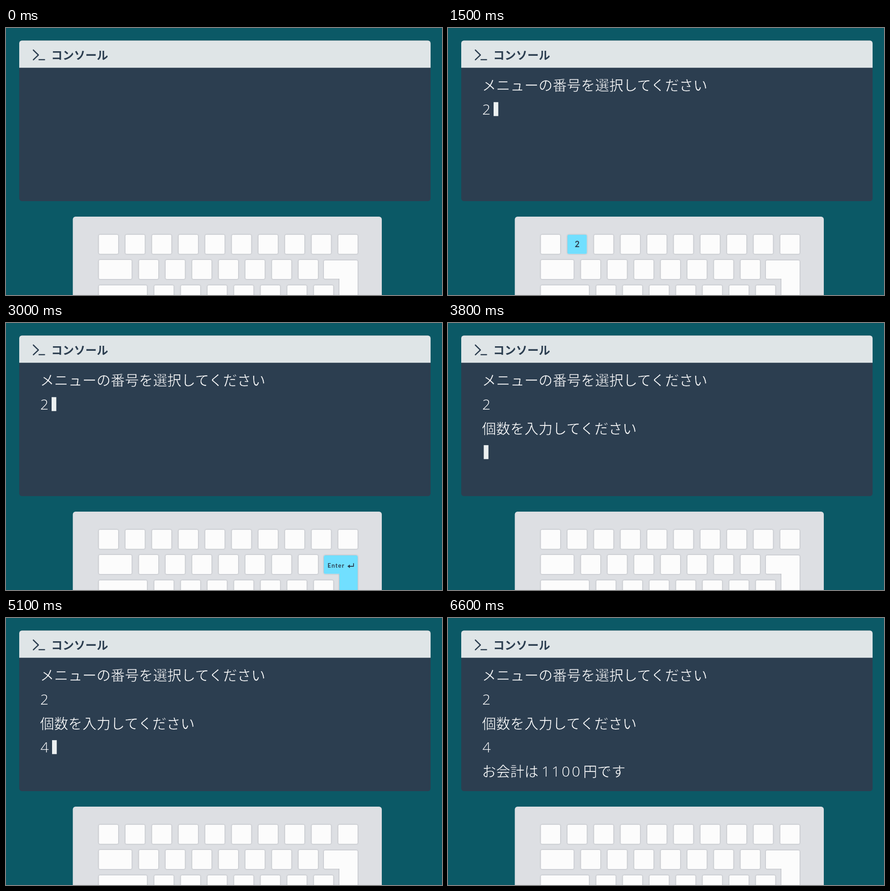
Write an HTML page that moves like this. It is 956 px wide and 586 px high and loops after 8600 ms.

```html
<!DOCTYPE html>
<html lang="ja">
<head>
<meta charset="utf-8">
<title>コンソール</title>
<style>
  html, body { margin: 0; width: 100%; height: 100%; overflow: hidden; background: #0b5966; }
  svg { display: block; width: 956px; height: 586px; }
  text { white-space: pre; }
  .title { font: 700 25px "Noto Sans CJK JP", sans-serif; fill: #2c3e50; }
  .jp { font: 300 31px "Noto Sans CJK JP", sans-serif; fill: #fff; }
  .num { font: 300 32px "Open Sans", sans-serif; fill: #fff; letter-spacing: 3.8px; }
  .thin { stroke: #2c3e50; stroke-width: .6px; }
  .cap { font: 700 13px Lato, sans-serif; fill: #2c3e50; letter-spacing: 1.3px; }
  .digit { font-size: 18px; letter-spacing: 0; text-anchor: middle; }
  .cursor { fill: #ecf0f1; }
  .key { fill: #fcfcfc; }
  .lit { fill: #71dfff; }
  .ink { fill: none; stroke: #2c3e50; stroke-linecap: round; stroke-linejoin: round; }
  #keys { filter: drop-shadow(0 0 1.5px rgba(50, 55, 65, .38)); }
</style>
</head>
<body>
<svg viewBox="0 0 956 586">
  <rect width="956" height="586" fill="#0b5966"/>
  <rect x="29" y="27.5" width="902" height="352.5" rx="6" fill="#2c3e50"/>
  <path d="M29 87.3V33.5a6 6 0 0 1 6-6H925a6 6 0 0 1 6 6V87.3Z" fill="#dfe5e7"/>
  <path class="ink" stroke-width="2.6" d="M60 48.5L71 59.3L60 69.7M72.5 69.5H84.5"/>
  <text class="title" x="99" y="69">コンソール</text>
  <rect x="146.5" y="414" width="677.5" height="190" rx="6" fill="#dddfe3"/>
  <g id="keys"></g>
  <g id="live"></g>
</svg>
<script>
const LOOP = 8600;
const keys = document.getElementById('keys');
const live = document.getElementById('live');

function add(parent, tag, attrs, text = '') {
  const el = document.createElementNS('http://www.w3.org/2000/svg', tag);
  for (const name in attrs) el.setAttribute(name, attrs[name]);
  el.textContent = text;
  parent.append(el);
  return el;
}

// Show an element between two times of the loop, with hard cuts.
function show(el, on, off = LOOP) {
  const step = (opacity, time) => ({ opacity, offset: time / LOOP, easing: 'step-end' });
  el.style.opacity = 0;
  el.animate([step(0, 0), step(1, on), step(0, off), step(0, LOOP)],
    { duration: LOOP, iterations: Infinity });
}

// Keyboard
const PITCH = 58.33;
const keyBox = (x, y, width = 42.4) => ({ x, y, width, height: 42, rx: 3 });
const keyX = i => 203.6 + i * PITCH;
const enterShape = 'M700 510H768a3 3 0 0 1 3 3V600H731V550.5H700a3 3 0 0 1-3-3V513a3 3 0 0 1 3-3Z';

function addKey(x, y, width) {
  add(keys, 'rect', { ...keyBox(x, y, width), class: 'key' });
}
for (let i = 0; i < 10; i++) addKey(keyX(i), 453.8);
addKey(203.6, 509, 72);
addKey(203.6, 564.7, 105.4);
for (let i = 0; i < 7; i++) {
  addKey(291.6 + i * PITCH, 509);
  addKey(325.2 + i * PITCH, 564.7);
}
add(keys, 'path', { d: enterShape, class: 'key' });

function pressDigit(n, on, off) {
  const g = add(live, 'g', {});
  const box = keyBox(keyX(n - 1), 453.8);
  add(g, 'rect', { ...box, class: 'lit' });
  add(g, 'text', { x: box.x + box.width / 2, y: 481, class: 'cap digit' }, n);
  show(g, on, off);
}

function pressEnter(on, off) {
  const g = add(live, 'g', {});
  add(g, 'path', { d: enterShape, class: 'lit' });
  add(g, 'text', { x: 705, y: 537, class: 'cap' }, 'Enter');
  add(g, 'path', { d: 'M762 528V534H752', class: 'ink', 'stroke-width': 1.8 });
  add(g, 'path', { d: 'M748.5 534L754 530V538Z', fill: '#2c3e50' });
  show(g, on, off);
}

// Console
const lineY = row => 137.2 + row * 52.7;
const write = (cls, row, x, text, on) =>
  show(add(live, 'text', { class: cls, x, y: lineY(row) }, text), on);
const cursor = (row, x, on, off) =>
  show(add(live, 'rect', { class: 'cursor', x, y: lineY(row) - 27.2, width: 10.3, height: 30.6 }), on, off);

write('jp', 0, 74.5, 'メニューの番号を選択してください', 1000);
write('num', 1, 75, '2', 1500);
write('jp', 2, 74.5, '個数を入力してください', 3200);
write('num', 3, 75.5, '4', 4300);
write('jp', 4, 74.5, 'お会計は', 6000);
write('num', 4, 205.2, '1100', 6000);
write('jp', 4, 296.2, '円です', 6000);

cursor(1, 78.4, 1000, 1500);
cursor(1, 100, 1500, 3200);
cursor(3, 78.4, 3200, 4300);
cursor(3, 101, 4300, 6000);

pressDigit(2, 1500, 2300);
pressEnter(3000, 3800);
pressDigit(4, 4300, 5100);
pressEnter(5800, 6600);

// Slim the strokes where no light weight is installed.
const pen = document.createElement('canvas').getContext('2d');
function widthOf(weight, family) {
  pen.font = `${weight} 100px "${family}", sans-serif`;
  return pen.measureText('Hamburg').width;
}
for (const [cls, family] of [['jp', 'Noto Sans CJK JP'], ['num', 'Open Sans']]) {
  if (widthOf(300, family) === widthOf(400, family)) {
    live.querySelectorAll('.' + cls).forEach(el => el.classList.add('thin'));
  }
}
</script>
</body>
</html>
```
